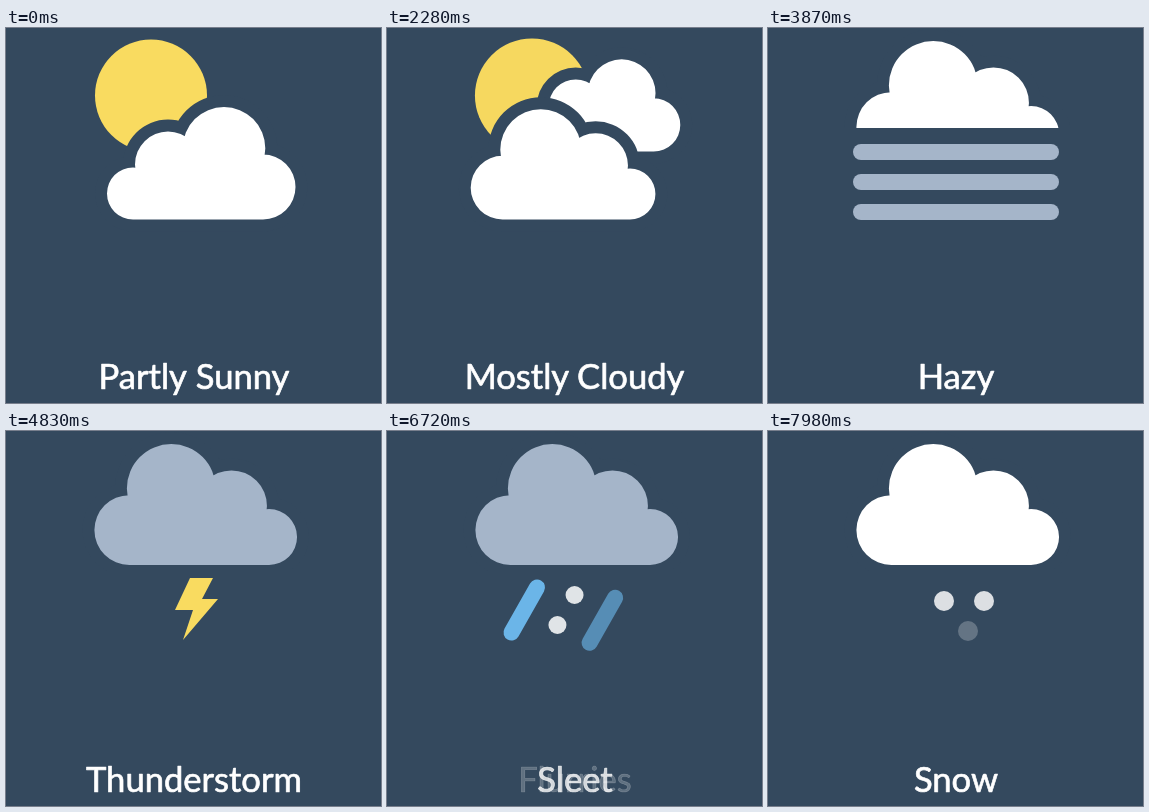
An HTML page with a canvas for the animation above (8000 ms loop, 375 by 375 pixels).

```html
<!DOCTYPE html>
<html lang="en">
<head>
<meta charset="utf-8">
<title>Weather icons</title>
<style>
html, body { margin: 0; width: 100%; height: 100%; overflow: hidden; background: #34495e; }
canvas { display: block; }
</style>
</head>
<body>
<canvas id="stage" width="375" height="375"></canvas>
<script>
const g = document.getElementById('stage').getContext('2d');
const BG = '#34495e', SUN = '#f9db60', BLUE = '#6bb5e8', BAR = '#a5b5c9';
const SLOPE = -0.57;

// Bumps of the cloud, relative to the middle of its flat base: x, y, radius
const BUMPS = [[-68, -26, 26], [-33, -55, 33], [23, -71.2, 41.3], [62, -32.5, 32.5]];

const LABELS = [
  [0, 'Partly Sunny'], [630, 'Partly Cloudy'], [1500, 'Mostly Cloudy'],
  [2280, 'Cloudy'], [3150, 'Hazy'], [4200, 'Thunderstorm'],
  [5070, 'Rain'], [5880, 'Sleet'], [6630, 'Flurries'], [7440, 'Snow']
];

const lerp = (a, b, p) => a + (b - a) * p;
const span = (t, start, length) => Math.min(1, Math.max(0, (t - start) / length));
const smooth = p => p * p * (3 - 2 * p);
const outQuint = p => 1 - (1 - p) ** 5;
const outBack = p => 1 + 2.7 * (p - 1) ** 3 + 1.7 * (p - 1) ** 2;
const mix = (a, b, p) => `rgb(${a.map((v, i) => Math.round(lerp(v, b[i], p)))})`;

function paint(color, alpha, shape) {
  if (alpha <= 0) return;
  g.globalAlpha = Math.min(1, alpha);
  g.fillStyle = color;
  g.beginPath();
  shape();
  g.fill();
  g.globalAlpha = 1;
}

function dot(x, y, r, color, alpha) {
  paint(color, alpha, () => g.arc(x, y, r, 0, 7));
}

function cloudPath(grow, midGrow) {
  BUMPS.forEach(([x, y, r], i) => {
    const R = r + (i === 1 ? midGrow : grow);
    g.moveTo(x + R, y);
    g.arc(x, y, R, 0, Math.PI * 2);
  });
  g.rect(-68, -45, 130, 45 + grow);
}

// A cloud with a background-coloured margin that cuts into whatever is behind it
function cloud({ x, y = 191.5, s = 1, flip = false, alpha = 1, color = '#fff', midGap = 12 }) {
  g.save();
  g.translate(x, y);
  g.scale(flip ? -s : s, s);
  paint(BG, alpha, () => cloudPath(12 / s, midGap / s));
  paint(color, alpha, () => cloudPath(0, 0));
  g.restore();
}

function streak(x, fall, alpha) {
  if (alpha <= 0) return;
  const dx = fall * SLOPE;
  g.globalAlpha = alpha;
  g.strokeStyle = BLUE;
  g.lineWidth = 16;
  g.lineCap = 'round';
  g.beginPath();
  g.moveTo(x + 25.5 + dx, 156.5 + fall);
  g.lineTo(x + dx, 201.5 + fall);
  g.stroke();
  g.globalAlpha = 1;
}

// Opacity and fall distance of a drop that fades in, then drops away
function drop(t, enter, leave, distance = 28) {
  const out = span(t, leave, 150) ** 2;
  return { alpha: smooth(span(t, enter, 200)) * (1 - out), fall: distance * out };
}

function fairSky(t) {
  const gone = span(t, 2250, 430);
  dot(145 - gone, 67.5, 56 + 14 * gone, SUN, 1 - smooth(gone));

  const back = smooth(span(t, 1500, 330)) * (1 - span(t, 3150, 250));
  cloud({ x: 215.8, y: 123.6, s: 0.82, alpha: back });

  const leave = span(t, 630, 150);
  cloud({ x: 195 + 16 * leave, alpha: 1 - leave });

  const p = outQuint(span(t, 630, 600));
  if (t < 3150) {
    cloud({
      x: lerp(67, 176.3, p), s: lerp(0.38, 0.98, p), flip: true,
      alpha: span(t, 630, 120), midGap: 12 + Math.min(9, 80 * (1 - p))
    });
  }
}

function highCloud(t) {
  const p = outBack(span(t, 3150, 500));
  const cut = t < 4200
    ? lerp(192, 100, smooth(span(t, 3150, 500)))
    : lerp(100, 140, smooth(span(t, 4200, 350)));
  const gray = [165, 181, 201], white = [255, 255, 255];
  const shade = span(t, 4200, 600) * (1 - span(t, 7440, 530));
  g.save();
  g.beginPath();
  g.rect(0, 0, 375, cut);
  g.clip();
  cloud({
    x: lerp(176.3, 190, p), y: lerp(191.5, 134, p), s: lerp(0.98, 1.075, p),
    flip: true, color: mix(white, gray, shade)
  });
  g.restore();
}

function haze(t) {
  for (let i = 0; i < 3; i++) {
    const p = smooth(span(t, 3350 + i * 110, 300));
    const alpha = p * (1 - span(t, 4200 + i * 60, 220));
    const w = 206 * lerp(0.8, 1, p);
    paint(BAR, alpha, () => g.roundRect(188 - w / 2, 116 + 30 * i, w, 16, 8));
  }
}

function bolt(t) {
  const alpha = smooth(span(t, 4500, 330)) * (1 - span(t, 5070, 250));
  paint(SUN, alpha, () => {
    g.moveTo(184, 147);
    for (const [x, y] of [[207, 147], [196, 168], [212, 168], [177, 209], [187, 179], [169, 179]]) g.lineTo(x, y);
  });
}

function rain(t) {
  for (let i = 0; i < 3; i++) {
    const d = drop(t, 5330 + i * 150, 6080 - i * 100);
    streak(124.5 + 38 * i, d.fall, d.alpha);
  }
}

function sleet(t) {
  for (let i = 0; i < 3; i++) {
    const d = drop(t, 6180 + i * 50, 6830 - i * 100);
    if (i !== 1) {
      streak(124.5 + 42 * i, d.fall, d.alpha);
    } else {
      for (const y of [164, 194]) {
        dot(179 + (y - 179 + d.fall) * SLOPE, y + d.fall, 9, '#fff', d.alpha * 0.85);
      }
    }
  }
}

function flurries(t) {
  for (let i = 0; i < 3; i++) {
    const out = span(t, 7440 + (2 - i) * 50, 150) ** 2;
    const alpha = span(t, i === 1 ? 7030 : 7075, 330) * (1 - out);
    dot(131 + 38 * i + 12 * out * SLOPE, 186 + 12 * out, 9, '#fff', alpha);
  }
}

function snow(t) {
  dot(176, 170, 10, '#fff', span(t, 7700, 340));
  dot(216, 170, 10, '#fff', span(t, 7700, 340));
  dot(200, 200, 10, '#fff', span(t, 7900, 340));
}

// Left edge of every word of a centred line
function layout(text) {
  const left = 188 - g.measureText(text).width / 2;
  return new Map(text.split(' ').map(word =>
    [word, left + g.measureText(text.slice(0, text.indexOf(word))).width]));
}

function write(word, x, alpha) {
  g.globalAlpha = alpha;
  g.fillText(word, x, 360.5);
  g.strokeText(word, x, 360.5);
}

// Words shared by two labels slide over, the others cross-fade
function label(t) {
  g.font = '34.6px Lato, "Open Sans", sans-serif';
  g.fillStyle = g.strokeStyle = '#fff';
  g.lineWidth = 0.7;
  g.lineJoin = 'round';
  const i = LABELS.findLastIndex(([start]) => start <= t);
  const [start, text] = LABELS[i];
  const from = layout(LABELS[Math.max(0, i - 1)][1]), to = layout(text);
  const p = span(t, start, 300), fade = smooth(p);
  from.forEach((x, word) => {
    if (!to.has(word)) write(word, x, 1 - fade);
  });
  to.forEach((x, word) => {
    if (from.has(word)) write(word, lerp(from.get(word), x, outQuint(p)), 1);
    else write(word, x, fade);
  });
  g.globalAlpha = 1;
}

function draw(now) {
  const t = now % 8000;
  g.fillStyle = BG;
  g.fillRect(0, 0, 375, 375);
  fairSky(t);
  if (t >= 3150) highCloud(t);
  [haze, bolt, rain, sleet, flurries, snow, label].forEach(part => part(t));
  requestAnimationFrame(draw);
}
requestAnimationFrame(draw);
</script>
</body>
</html>
```
